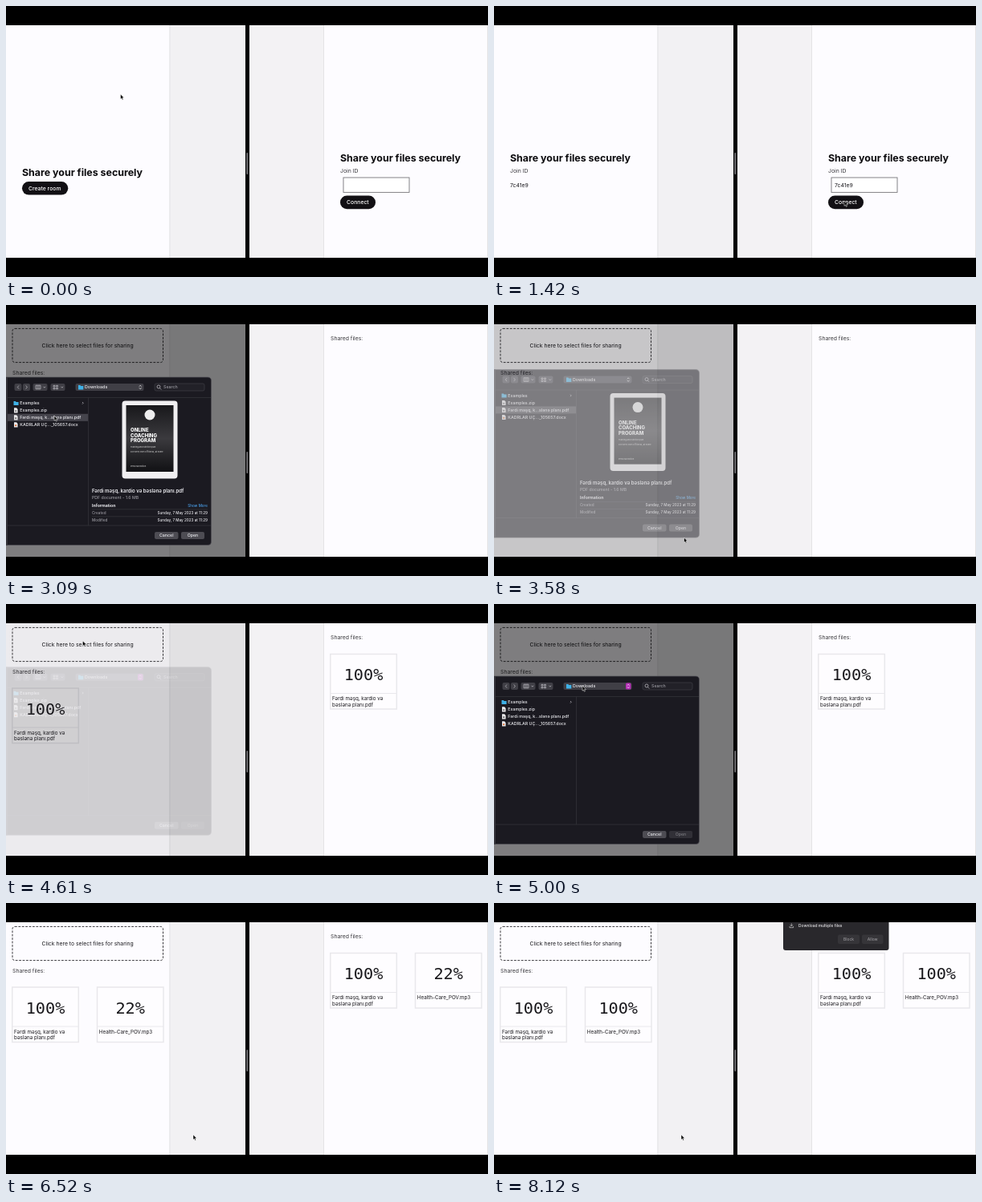
Write an HTML page that moves like this. It is 600 px wide and 338 px high and loops after 8.15 s.

```html
<!DOCTYPE html>
<html lang="en">
<head>
<meta charset="utf-8">
<style>
html, body { margin: 0; width: 100%; height: 100%; overflow: hidden; background: #000; }
svg { display: block; width: 600px; height: 338px; font: 6.85px Inter, sans-serif; fill: #18171b; }
.head { font-size: 12.4px; font-weight: 700; fill: #0c0b0e; }
.btn { fill: #121014; }
.btnText { fill: #fff; font-weight: 500; }
.label { fill: #39383c; }
.count { font: 20.2px "DejaVu Sans Mono", monospace; text-anchor: middle; }
.name { font-size: 6.25px; }
.frame { fill: #fefdff; stroke: #e9e8ec; stroke-width: 1.5; }
#dialog { font-size: 5.3px; font-weight: 500; fill: #ececf0; }
#dialog .dim { fill: #9a99a0; }
#dialog .key { fill: #4d4c53; }
#dialog .hl { fill: #45444c; }
#dialog .line { stroke: #36353c; stroke-width: .7; }
#dialog .icon { fill: none; stroke: #b5b4ba; stroke-width: .8; }
#preview { font-size: 4.6px; }
#music .row { font-size: 4.4px; }
.end { text-anchor: end; }
.mid { text-anchor: middle; }
</style>
</head>
<body>
<svg viewBox="0 0 600 338">
  <rect width="600" height="338"/>
  <rect y="24" width="298" height="290" fill="#fdfcff"/>
  <rect x="204" y="24" width="94" height="290" fill="#f2f1f3"/>
  <rect x="303" y="24" width="297" height="290" fill="#fdfcff"/>
  <rect x="303" y="24" width="92" height="290" fill="#f3f2f4"/>
  <path d="M203.8 24V314M395.5 24V314M599.5 24V314" stroke="#dddcdf" stroke-width=".8"/>

  <g id="home">
    <text id="leftHead" class="head" x="20" y="212">Share your files securely</text>
    <g id="create">
      <rect class="btn" x="20" y="219" width="57.3" height="16.6" rx="8.3"/>
      <text class="btnText" x="28" y="229.8">Create room</text>
    </g>
    <g id="room">
      <text class="label" x="20" y="208">Join ID</text>
      <text x="20" y="226">7c41e9</text>
    </g>
    <text class="head" x="416" y="194.3">Share your files securely</text>
    <text class="label" x="416" y="208.2">Join ID</text>
    <rect x="420" y="214" width="82" height="18.4" fill="#fff" stroke="#77767a" stroke-width=".9"/>
    <text id="pasted" x="424" y="225.8">7c41e9</text>
    <rect class="btn" x="416" y="236.6" width="44" height="16.6" rx="8.3"/>
    <text class="btnText" x="424" y="247.4">Connect</text>
  </g>

  <g id="share">
    <rect x="8" y="29.4" width="187.5" height="42.2" rx="3" fill="none" stroke="#3c3b3f" stroke-dasharray="2.8 1.6"/>
    <text class="mid" x="101.6" y="53">Click here to select files for sharing</text>
    <text class="label" x="8" y="87">Shared files:</text>
    <text class="label" x="404" y="44.2">Shared files:</text>
    <g id="card0"></g>
    <g id="card1"></g>
  </g>

  <rect id="shade" y="24" width="298" height="290" fill="#000"/>
  <g id="dialog">
    <path d="M0 90H251Q255.5 90 255.5 94.5V295Q255.5 299.5 251 299.5H0Z" fill="#1b1a21" stroke="#55545b" stroke-width=".7"/>
    <path d="M0 90H2V299.5H0Z" fill="#34333a"/>
    <path class="line" d="M2 115.5H255M2 275H255"/>
    <g class="key" opacity=".75">
      <rect x="10.5" y="98" width="9" height="9" rx="2"/><rect x="21" y="98" width="9" height="9" rx="2"/>
      <rect x="33.5" y="98" width="18" height="9" rx="2"/><rect x="55.5" y="98" width="18" height="9" rx="2"/>
      <rect x="86.5" y="98" width="85" height="9" rx="2"/>
    </g>
    <rect x="185" y="98" width="62" height="9" rx="2" fill="#222128" stroke="#45444b" stroke-width=".6"/>
    <path class="icon" d="M16 100.5l-1.7 2 1.7 2M24.7 100.5l1.7 2-1.7 2M37 100.2h6v4.6h-6zM39 100.2v4.6M41 100.2v4.6M46.5 101.8l1.3 1.4 1.3-1.4M59 100.4h2v1.5h-2zM62.5 100.4h2v1.5h-2zM59 103.4h2v1.5h-2zM62.5 103.4h2v1.5h-2zM68.5 101.8l1.3 1.4 1.3-1.4M191.3 103.5l2 2M192 102a2 2 0 1 1-4 0 2 2 0 1 1 4 0"/>
    <path d="M90 100h2.4l.8 1H96.300v4.500H90z" fill="#3fb1e6"/>
    <text id="place" x="98" y="104.300"></text>
    <rect id="accent" x="164" y="98.500" width="6.500" height="8" rx="1.500" fill="#b32cb4"/>
    <path d="M165.800 101.700l1.400-1.500 1.400 1.500M165.800 103.300l1.400 1.500 1.400-1.500" fill="none" stroke="#fff" stroke-width=".7"/>
    <text class="dim" x="196" y="104.300">Search</text>

    <g id="folder">
      <path class="line" d="M102.500 115.500V275"/>
      <rect id="pick" class="hl" x="2" y="135.800" width="100" height="9"/>
      <g id="files"></g>
      <path class="icon" d="M95 121l1.200 1.300-1.200 1.300"/>
    </g>

    <g id="preview">
      <rect x="144.500" y="119.500" width="69" height="97" rx="4" fill="#f0eff1"/>
      <rect x="149.500" y="125" width="59" height="83" fill="url(#cover)"/>
      <circle cx="179" cy="137" r="6.500" fill="#eee"/>
      <g font-size="6" font-weight="800" fill="#fff">
        <text x="155" y="158">ONLINE</text><text x="155" y="164.500">COACHING</text><text x="155" y="171">PROGRAM</text>
      </g>
      <g font-size="2.500" fill="#ccc">
        <text x="155" y="178">Training and nutrition plan</text><text x="155" y="184">For every level of fitness, at home</text>
        <text x="155" y="202">Personal edition</text>
      </g>
      <text x="107" y="233.800" font-size="6.050" font-weight="600">Fərdi məşq, kardio və bəslənə planı.pdf</text>
      <text class="dim" x="107" y="241.800" font-size="5.200">PDF document - 1.6 MB</text>
      <text x="107" y="251.800" font-size="5.200" font-weight="700">Information</text>
      <text class="end" x="251" y="251.800" style="fill:#4a9fe8">Show More</text>
      <path class="line" d="M107 254.800H251M107 263.800H251"/>
      <text class="dim" x="107" y="260.800">Created</text>
      <text class="end" x="251" y="260.800">Sunday, 7 May 2023 at 11:29</text>
      <text class="dim" x="107" y="269.800">Modified</text>
      <text class="end" x="251" y="269.800">Sunday, 7 May 2023 at 11:29</text>
    </g>

    <g id="music"></g>

    <rect class="key" x="185" y="283" width="29.500" height="9" rx="2"/>
    <text class="mid" x="199.700" y="289.400">Cancel</text>
    <g id="open">
      <rect class="key" x="218" y="283" width="29" height="9" rx="2"/>
      <text class="mid" x="232.500" y="289.400">Open</text>
    </g>
  </g>

  <g id="popup" font-weight="500" font-size="4.900">
    <path d="M360 24H491.500V56Q491.500 59 488.500 59H363Q360 59 360 56Z" fill="#29282c"/>
    <path d="M370.300 25.500v3.200M368.700 27.300l1.600 1.700 1.600-1.700M368 29v1.700h4.600V29" fill="none" stroke="#bbb" stroke-width=".8"/>
    <text x="379" y="29.800" fill="#e4e3e6">Download multiple files</text>
    <rect x="428" y="39.500" width="27" height="11.500" rx="2" fill="#363539"/>
    <rect x="458" y="39.500" width="26.500" height="11.500" rx="2" fill="#363539"/>
    <text class="mid" x="441.500" y="47" fill="#98979b">Block</text>
    <text class="mid" x="471.200" y="47" fill="#98979b">Allow</text>
  </g>

  <path d="M0 0H600V24H0ZM0 314H600V338H0ZM298 24H303V314H298Z" fill="#000"/>
  <rect x="299.300" y="183" width="1.700" height="27" rx=".8" fill="#77767a"/>
  <path id="cursor" d="M0 0V6.200L1.400 5 2.400 7.200 3.400 6.800 2.500 4.600H4.400Z" fill="#000" stroke="#fff" stroke-width=".5"/>
  <defs>
    <linearGradient id="cover" x2="0" y2="1">
      <stop stop-color="#18181b"/><stop offset=".5" stop-color="#3b3a3e"/><stop offset="1" stop-color="#111114"/>
    </linearGradient>
  </defs>
</svg>
<script>
const LOOP = 8150, STEP = 30;
const $ = id => document.getElementById(id);
const show = (id, on) => $(id).style.display = on ? "" : "none";

// Each file has one card on either side.
const cardNames = [["Fərdi məşq, kardio və", "bəslənə planı.pdf"], ["Health-Care_POV.mp3"]];
const card = (x, y, lines) => `<g transform="translate(${x} ${y})">
  <rect class="frame" width="82.500" height="68.500"/>
  <path d="M0 49H82.500" stroke="#e9e8ec"/>
  <text class="count" x="41.200" y="32.600"></text>
  ${lines.map((s, i) => `<text class="name" x="2.300" y="${57.500 + i * 7.600}">${s}</text>`).join("")}</g>`;
cardNames.forEach((lines, i) => {
  $("card" + i).innerHTML = card(7.800 + 105.700 * i, 105, lines) + card(403.800 + 105.700 * i, 62.500, lines);
});

const files = ["Examples", "Examples.zip", "Fərdi məşq, k...slənə planı.pdf", "KADRLAR UÇ..._105657.docx"];
$("files").innerHTML = files.map((name, i) => {
  const y = 122.300 + 9 * i;
  const icon = i ? `<path d="M10 ${y - 3}h3l1.600 1.600v4.600H10z" fill="#e9e8ea"/><path d="M11 ${y}h2.200v1.800H11z" fill="${["", "#888", "#777", "#d9733c"][i]}"/>`
    : `<path d="M9.500 ${y - 2.300}h2.300l.8 1h3v4H9.500z" fill="#3fb1e6"/>`;
  return `${icon}<text x="17.300" y="${y + 1.900}">${name}</text>`;
}).join("");

const tracks = [
  ["Nepal-Part-1_MAIN_STORY", "15:07", "RT Vane"], ["Nepal-Part-1_POV", "11:28", "RT Vane"],
  ["Nepal-Part-2_MS", "23:20"], ["Teaching-Teacher-2_MS", "22:50"], ["Health-Care_POV", "7:16"],
  ["Earthquakes POV", "8:00"], ["Earthquakes MS", "38:34"], ["Drunk-Driving_POV", "6:25"],
  ["Dating_POV", "5:10"], ["Drunk-Driving_MS", "35:07"], ["WINTER AT MY DOOR", "2:25"]
];
const note = (x, y) => `<path d="M${x} ${y + 2}v-4.500l3-.6v4.300" fill="none" stroke="#eee" stroke-width=".8"/>`;
$("music").innerHTML = `
  <rect class="hl" x="5" y="130.500" width="246" height="9" rx="1.500"/>
  <circle cx="17" cy="125.500" r="2.600" fill="#d9d5cf"/><text x="22.500" y="127.400">TuneCellar</text>
  <path class="icon" d="M9 134.500l1.300 1.300 1.300-1.300"/>
  <circle cx="17" cy="135" r="2.600" fill="#e2506d"/><text x="22.500" y="136.900">Media</text>
  ${note(20.500, 145)}<text x="27" y="146.400">Music</text>
  <path class="line" d="M2 151.500H255M2 162.500H255"/>
  <g font-size="4.600" font-weight="600"><text x="10" y="159">Name</text><text x="110" y="159">Artist</text><text class="end" x="248" y="159">Time</text></g>
  ${Array.from({length: 16}, (_, i) => i % 2 ? `<rect x="5" y="${164.800 + 6.580 * i}" width="246" height="6.580" fill="#25242b"/>` : "").join("")}
  <rect id="pickTrack" class="hl" x="5" y="191.100" width="246" height="6.600"/>
  ${tracks.map(([name, time, artist = ""], i) => {
    const y = 168.100 + 6.580 * i;
    return `<g class="row"><rect x="11" y="${y - 2.700}" width="4.600" height="5.400" fill="#e6e4e6"/>
      <circle cx="13.300" cy="${y + .3}" r="1.400" fill="#d94a66"/>
      <text x="18.800" y="${y + 1.600}">${name}</text><text x="111" y="${y + 1.600}">${artist}</text>
      <text class="end" x="248" y="${y + 1.600}">${time}</text></g>`;
  }).join("")}`;

// Interpolates rows of [time, ...values].
function track(keys, t, ease = u => u) {
  const i = keys.findIndex(k => k[0] > t);
  if (i === 0) return keys[0].slice(1);
  if (i < 0) return keys[keys.length - 1].slice(1);
  const a = keys[i - 1], b = keys[i], u = ease((t - a[0]) / (b[0] - a[0]));
  return a.slice(1).map((v, j) => v + (b[j + 1] - v) * u);
}
const smooth = u => u * u * (3 - 2 * u);

const cursorPath = [
  [0, 142.500, 110], [120, 61, 224], [360, 61, 224], [760, 52, 222], [1150, 436, 222], [1270, 436, 222],
  [1440, 436, 245], [1600, 436, 245], [1950, 110, 58], [2090, 101, 53], [2760, 101, 53],
  [2910, 60, 138], [3120, 60, 138], [3450, 236.500, 290], [3640, 236.500, 290], [3880, 190, 200],
  [4120, 190, 200], [4480, 95.500, 46], [4700, 95.500, 46], [4960, 110, 102], [5100, 110, 102],
  [5310, 42, 192], [5380, 42, 192], [5580, 233, 289]
];
const dialogLevel = [
  [2120, 0], [2210, 1], [3530, 1], [3600, 0], [4580, 0], [4655, 1], [5610, 1], [5685, 0]
];
const progress = [[[3610, 0], [3880, 100]], [[5730, 0], [6505, 22], [6550, 22.500], [8040, 100]]];

function draw(time) {
  const t = Math.floor(time % LOOP / STEP) * STEP;
  const shared = t >= 1620, created = t >= 390;
  show("home", !shared);
  show("share", shared);
  $("leftHead").setAttribute("y", created ? 194.300 : 212);
  show("create", !created);
  show("room", created);
  show("pasted", t >= 1260);

  progress.forEach((keys, i) => {
    show("card" + i, t >= [3610, 5700][i]);
    const label = Math.floor(track(keys, t)[0]) + "%";
    $("card" + i).querySelectorAll(".count").forEach(el => el.textContent = label);
  });

  const [level] = track(dialogLevel, t);
  const music = t >= 5100, picked = t >= 2940 && t < 3700, trackPicked = t >= 5340;
  $("shade").setAttribute("opacity", level / 2);
  $("dialog").setAttribute("opacity", level);
  $("dialog").setAttribute("transform", `translate(0 ${-11.500 * (1 - level * level)})`);
  $("place").textContent = music ? "Music" : "Downloads";
  show("folder", !music);
  show("music", music);
  show("pick", picked);
  show("preview", picked);
  show("pickTrack", trackPicked);
  show("accent", !picked && !music);
  $("open").setAttribute("opacity", picked || trackPicked ? 1 : .45);

  show("popup", t >= 8070);
  $("cursor").setAttribute("transform", `translate(${track(cursorPath, t, smooth)})`);
}

const start = performance.now();
function tick() {
  draw(performance.now() - start);
  requestAnimationFrame(tick);
}
tick();
</script>
</body>
</html>
```
